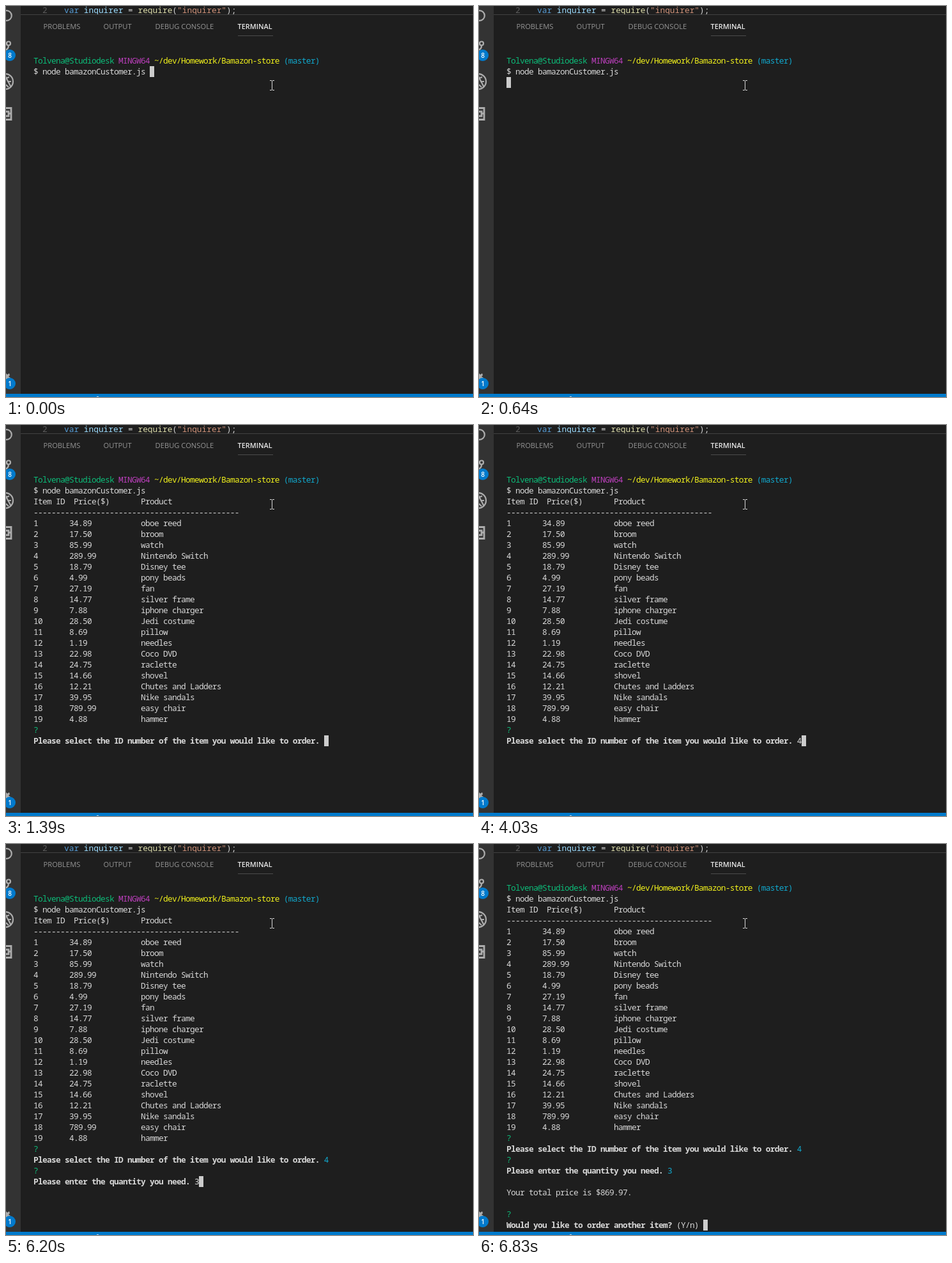
Animation, 731 px wide and 611 px high, one loop 8000 ms. Source, as an HTML page:

```html
<!DOCTYPE html>
<html lang="en">
<head>
<meta charset="utf-8">
<title>Store terminal</title>
<style>
  html, body { margin: 0; width: 100%; height: 100%; overflow: hidden; background: #1e1e1e; }
  svg { position: absolute; left: 0; top: 0; }
  pre { position: absolute; left: 43px; margin: 0; color: #d8d8d8; }
  pre, .code { font-family: "Noto Sans Mono", monospace; font-size: 12.833px; font-weight: 500; }
  pre { line-height: 17px; letter-spacing: -0.7px; }
  .code { white-space: pre; }
  .ui { font: 500 11.2px "Open Sans", sans-serif; fill: #959595; }
  .ui .active { font-size: 10.9px; font-weight: 600; fill: #e7e7e7; }
  .badge { font: 600 10px "Open Sans", sans-serif; fill: #fff; text-anchor: middle; }
  .green { color: #0dbc79; }
  .purple { color: #bc3fbc; }
  .yellow { color: #f2f21c; }
  .cyan { color: #11a8cd; }
  .cursor { display: inline-block; width: 7px; height: 17px; vertical-align: top; background: #ccc; }
</style>
</head>
<body>
<svg width="731" height="611" viewBox="0 0 731 611">
  <rect width="23" height="611" fill="#333"/>

  <g fill="none" stroke="#adadad" stroke-width="2.2">
    <circle cx="1" cy="15" r="7.8"/>
    <circle cx="4" cy="58.5" r="3"/>
    <path d="M4 62 Q4 67 -1 69"/>
    <circle cx="-1" cy="118" r="12"/>
    <path d="M-2 108 L8 127 M0 113 L5 111 M2 118 H8 M0 123 L4 127"/>
    <path d="M0 159.5 H8 V177.5 H0 M0 165 H4 V172 H0 M4 168 H8" stroke-width="2.8"/>
  </g>
  <path d="M0 574 L2 576 L5 574 L6 577 L4 579 L7 581 V585 H0 Z" fill="#adadad"/>
  <g fill="#007acc">
    <circle cx="6" cy="77" r="9"/>
    <circle cx="6" cy="590" r="9"/>
  </g>
  <text class="badge" x="6" y="80.5">8</text>
  <text class="badge" x="6" y="593.5">1</text>

  <svg width="731" height="13">
    <text class="code" x="57" y="11" fill="#5a5a5a">2</text>
    <text class="code" x="91" y="11" fill="#d4d4d4"><tspan fill="#569cd6">var</tspan> <tspan fill="#9cdcfe">inquirer</tspan> = <tspan fill="#dcdcaa">require</tspan>(<tspan fill="#ce9178">"inquirer"</tspan>);</text>
  </svg>
  <rect x="23" y="13" width="708" height="1" fill="#414141"/>

  <g class="ui">
    <text x="58.5" y="36">PROBLEMS</text>
    <text x="152.5" y="36">OUTPUT</text>
    <text x="233.5" y="36">DEBUG CONSOLE</text>
    <text class="active" x="362.5" y="36">TERMINAL</text>
  </g>
  <rect x="363" y="46" width="55" height="1" fill="#4c4c4c"/>

  <rect y="606" width="731" height="5" fill="#007acc"/>
  <rect x="142" y="610" width="3" height="1" fill="#b5d7ee"/>
</svg>

<pre id="terminal"></pre>

<svg width="731" height="611">
  <path d="M413 116.5 H416 M417 116.5 H420 M416.5 117 V131 M413 131.5 H416 M417 131.5 H420" stroke="#d8d8d8" fill="none"/>
</svg>

<script>
const LOOP = 8000;
const paint = (color, text) => `<span class="${color}">${text}</span>`;
const ask = text => `${paint("green", "?")}\n<b>${text}</b> `;

const products = [
  ["34.89", "oboe reed"], ["17.50", "broom"], ["85.99", "watch"],
  ["289.99", "Nintendo Switch"], ["18.79", "Disney tee"], ["4.99", "pony beads"],
  ["27.19", "fan"], ["14.77", "silver frame"], ["7.88", "iphone charger"],
  ["28.50", "Jedi costume"], ["8.69", "pillow"], ["1.19", "needles"],
  ["22.98", "Coco DVD"], ["24.75", "raclette"], ["14.66", "shovel"],
  ["12.21", "Chutes and Ladders"], ["39.95", "Nike sandals"],
  ["789.99", "easy chair"], ["4.88", "hammer"]
];

const command = [
  paint("green", "Tolvena@Studiodesk"), paint("purple", "MINGW64"),
  paint("yellow", "~/dev/Homework/Bamazon-store"), paint("cyan", "(master)")
].join(" ") + "\n$ node bamazonCustomer.js ";

const table = command + "\nItem ID  Price($)       Product\n" + "-".repeat(46) + "\n" +
  products.map(([price, name], i) => String(i + 1).padEnd(8) + price.padEnd(16) + name + "\n").join("");

const askItem = table + ask("Please select the ID number of the item you would like to order.");
const askCount = askItem + paint("cyan", "4") + "\n" + ask("Please enter the quantity you need.");
const askMore = askCount + paint("cyan", "3") + "\n\nYour total price is $869.97.\n\n" +
  ask("Would you like to order another item?") + "(Y/n) ";

const steps = [
  { at: 0, text: command },
  { at: 640, text: command + "\n" },
  { at: 1240, text: table },
  { at: 1390, text: askItem },
  { at: 4030, text: askItem + "4" },
  { at: 4660, text: askCount },
  { at: 6200, text: askCount + "3" },
  { at: 6830, text: askMore, top: 60 }
];

const terminal = document.getElementById("terminal");
const start = performance.now();
let shown;

function draw() {
  const time = (performance.now() - start) % LOOP;
  const step = steps.findLast(s => s.at <= time);
  if (step !== shown) {
    shown = step;
    terminal.style.top = (step.top ?? 77) + "px";
    terminal.innerHTML = step.text + '<span class="cursor"></span>';
  }
  requestAnimationFrame(draw);
}
draw();
</script>
</body>
</html>
```
